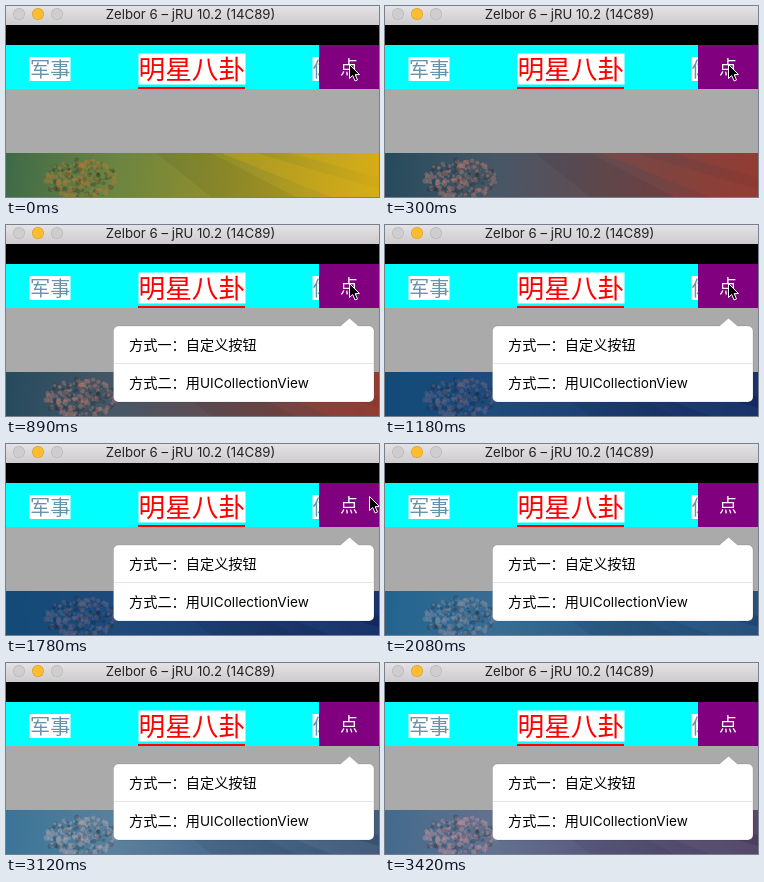
These frames come from a looping animation (373 by 191 pixels, 3.87 s). An HTML page with a canvas:

```html
<!DOCTYPE html>
<html lang="zh-CN">
<head>
<meta charset="utf-8">
<title>Tab bar</title>
<style>
html, body { margin: 0; width: 100%; height: 100%; overflow: hidden; background: #aaa; }
canvas { display: block; width: 373px; height: 191px; }
</style>
</head>
<body>
<canvas id="stage" width="373" height="191"></canvas>
<script>
const W = 373, H = 191, LOOP = 3870, PHOTO_Y = 147;
const ctx = document.getElementById('stage').getContext('2d');
const CJK = '"Noto Sans CJK SC", "Noto Sans CJK", sans-serif';
const LATIN = 'Inter, sans-serif';

// Each mood: four backdrop stops from left to right, then foliage and ray colours.
const moods = {
  gold:  ['#3f6a48', '#6c8540', '#918e2c', '#d2aa16', '#a8793c', '#e4b414'],
  red:   ['#254b5d', '#475766', '#634b50', '#8d3930', '#a2736d', '#a34536'],
  blue:  ['#124a78', '#1e4a7c', '#1d3f74', '#15285f', '#5d5f80', '#24508a'],
  cyan:  ['#327da3', '#518fab', '#397c9c', '#286487', '#98aeb9', '#5791a9'],
  mauve: ['#426b8d', '#63728e', '#5a587c', '#49405f', '#b08b99', '#766680']
};
// Time, first mood, second mood, blend.
const photoSteps = [
  [0, 'gold', 'gold', 0],
  [150, 'gold', 'red', 0.5],
  [300, 'red', 'red', 0],
  [1180, 'blue', 'blue', 0],
  [2080, 'blue', 'cyan', 0.5],
  [2230, 'cyan', 'cyan', 0],
  [3120, 'cyan', 'mauve', 0.5],
  [3270, 'mauve', 'mauve', 0]
];

function mix(a, b, k) {
  const part = (c, i) => parseInt(c.slice(i, i + 2), 16);
  const rgb = [1, 3, 5].map(i => Math.round(part(a, i) + (part(b, i) - part(a, i)) * k));
  return `rgb(${rgb})`;
}

function seeded(seed) {
  return () => (seed = (seed * 16807) % 2147483647) / 2147483647;
}

function rect(color, x, y, w, h) {
  ctx.fillStyle = color;
  ctx.fillRect(x, y, w, h);
}

function disc(color, x, y, r) {
  ctx.fillStyle = color;
  ctx.beginPath();
  ctx.arc(x, y, r, 0, Math.PI * 2);
  ctx.fill();
}

function poly(color, points) {
  ctx.fillStyle = color;
  ctx.beginPath();
  points.forEach(([x, y]) => ctx.lineTo(x, y));
  ctx.closePath();
  ctx.fill();
}

function label(text, x, y, size, color, family = CJK, align = 'left') {
  ctx.font = `${size}px ${family}`;
  ctx.textAlign = align;
  ctx.fillStyle = color;
  ctx.fillText(text, x, y);
}

function drawPhoto(t) {
  const [, a, b, k] = photoSteps.filter(s => s[0] <= t).pop();
  const [c0, c1, c2, c3, leaf, ray] = moods[a].map((c, i) => mix(c, moods[b][i], k));
  ctx.save();
  ctx.beginPath();
  ctx.rect(0, PHOTO_Y, W, H - PHOTO_Y);
  ctx.clip();

  const sky = ctx.createLinearGradient(0, PHOTO_Y, W, PHOTO_Y + 30);
  [c0, c1, c2, c3].forEach((c, i) => sky.addColorStop([0, 0.3, 0.58, 1][i], c));
  rect(sky, 0, PHOTO_Y, W, H - PHOTO_Y);

  ctx.globalAlpha = 0.25;
  poly(ray, [[215, 147], [250, 147], [373, 183], [373, 191], [325, 191]]);
  poly(ray, [[285, 147], [373, 147], [373, 172]]);
  ctx.globalAlpha = 0.06;
  poly('#000', [[150, 147], [205, 147], [290, 191], [205, 191]]);

  drawTree(leaf);
  ctx.restore();
}

function drawTree(leaf) {
  const rand = seeded(77);
  for (let i = 0; i < 230; i++) {
    const angle = rand() * Math.PI * 2, reach = Math.sqrt(rand());
    const x = 76 + Math.cos(angle) * reach * 36;
    const y = 174 + Math.sin(angle) * reach * 21;
    const shade = i % 3 === 0;
    ctx.globalAlpha = shade ? 0.22 : 0.5;
    disc(shade ? '#101820' : leaf, x, y, 0.8 + rand() * 2);
  }
}

function drawWindow() {
  const bar = ctx.createLinearGradient(0, 0, 0, 19);
  bar.addColorStop(0, '#e4e2e4');
  bar.addColorStop(1, '#cdcbcd');
  rect(bar, 0, 0, W, 19);
  [['#cfcdcf', '#b9b7b9', 13], ['#fdbd2e', '#dfa023', 32], ['#cfcdcf', '#b9b7b9', 51]]
    .forEach(([fill, edge, x]) => {
      disc(edge, x, 8, 6);
      disc(fill, x, 8, 5.3);
    });
  label('Zelbor 6 – jRU 10.2 (14C89)', 184.5, 13, 13.2, '#222', LATIN, 'center');
  rect('#000', 0, 19, W, 20);
}

function drawTabs() {
  rect('#0ff', 0, 39, W, 44);
  rect('#fff', 23.5, 51, 41, 24);
  label('军事', 24, 70.6, 20.2, '#6594ab');
  rect('#fff', 132.5, 47.5, 107, 31);
  label('明星八卦', 132.5, 73.2, 26.7, '#f00');
  rect('#f00', 132, 81, 107, 2);
  rect('#fff', 306.5, 51, 41, 24);
  label('体育', 306.5, 70.6, 20.2, '#6594ab');
  rect('#800080', 313, 39, 60, 44);
  label('点', 334, 67.6, 18, '#fff');
}

function popupPath() {
  const [left, top, right, bottom, r] = [107.5, 101, 368, 177, 5];
  ctx.beginPath();
  ctx.moveTo(left + r, top);
  ctx.lineTo(334.5, top);
  ctx.lineTo(343.5, 93.3);
  ctx.lineTo(352.5, top);
  ctx.arcTo(right, top, right, bottom, r);
  ctx.arcTo(right, bottom, left, bottom, r);
  ctx.arcTo(left, bottom, left, top, r);
  ctx.arcTo(left, top, right, top, r);
  ctx.closePath();
}

function drawPopup(t) {
  if (t < 740) return;
  const full = t >= 890;
  ctx.save();
  ctx.globalAlpha = full ? 1 : 0.74;
  popupPath();
  ctx.fillStyle = '#fff';
  ctx.fill();
  ctx.strokeStyle = 'rgba(0, 0, 0, 0.12)';
  ctx.lineWidth = 1;
  ctx.stroke();
  ctx.globalAlpha = full ? 1 : 0.82;
  rect(full ? '#e4e4e4' : '#d2d2d2', 108, 138, 260, 1);
  label('方式一：自定义按钮', 123, 125.3, 14.2, '#000');
  label('方式二：用', 123, 163.3, 14.2, '#000');
  label('UICollectionView', 194, 163.3, 13.6, '#000', LATIN);
  ctx.restore();
}

function drawCursor(t) {
  if (t >= 1930) return;
  const [x, y] = t < 1780 ? [343.5, 58.5] : [363.5, 52.5];
  ctx.save();
  ctx.translate(x, y);
  poly('#000', [[0, 0], [0, 14], [3.2, 11], [5.6, 16.5], [8, 15.5], [5.7, 10.2], [10, 10]]);
  ctx.strokeStyle = '#fff';
  ctx.lineWidth = 1;
  ctx.stroke();
  ctx.restore();
}

function draw(t) {
  rect('#aaa', 0, 0, W, H);
  drawPhoto(t);
  drawWindow();
  drawTabs();
  drawPopup(t);
  drawCursor(t);
}

const start = performance.now();
function tick() {
  draw((performance.now() - start) % LOOP);
  requestAnimationFrame(tick);
}
tick();
</script>
</body>
</html>
```
